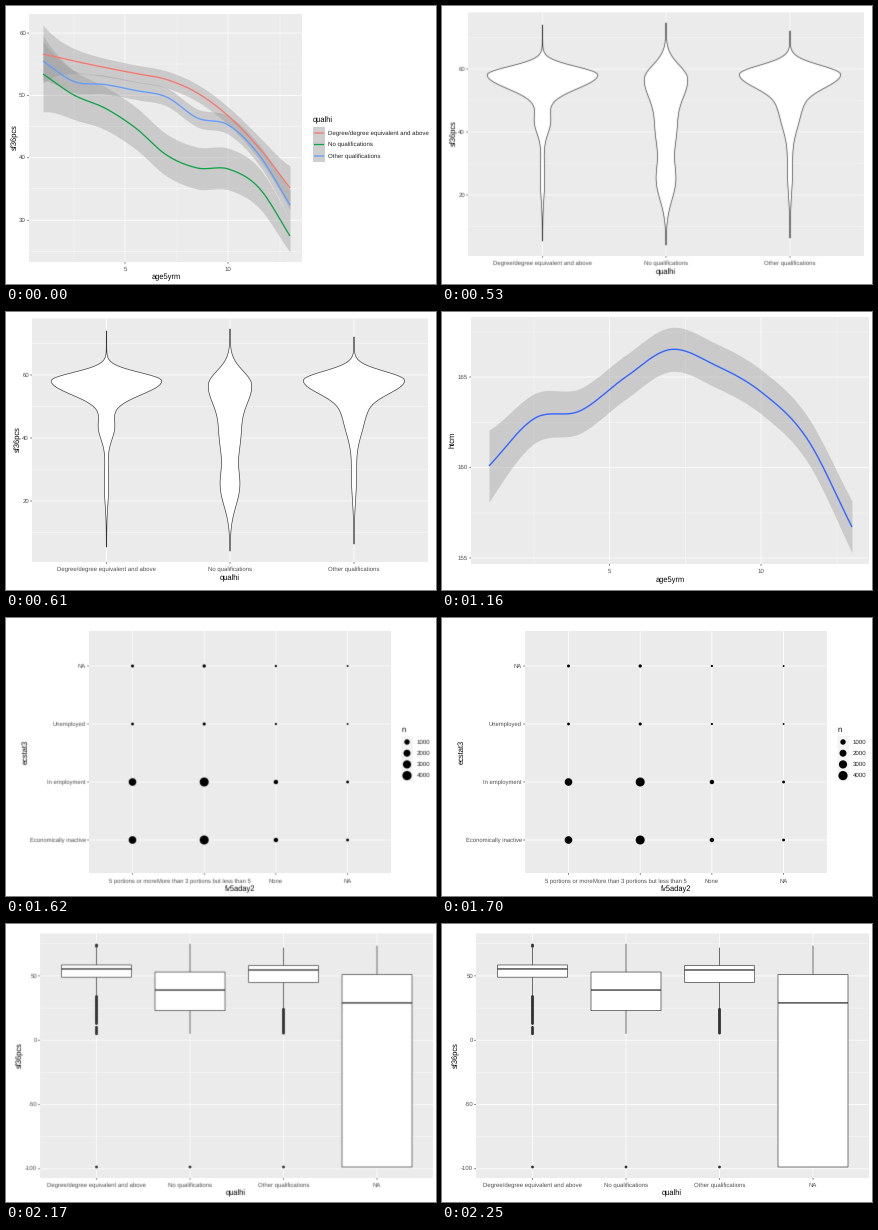
A matplotlib script for the animation above (2710 ms loop, 430 by 278 pixels).

```python
import numpy as np
import matplotlib.pyplot as plt
from matplotlib.animation import FuncAnimation
from matplotlib.patches import Circle, Rectangle

W, H, DPI = 430, 278, 64
LOOP, STEP, FADE = 2710, 10, 80
CUTS = [0, 530, 1080, 1620, 2170]
PX = 72 / DPI
SMALL, LARGE = 6.1, 7.5
GREY, DARK = "#4d4d4d", "#333333"
RED, GREEN, BLUE = "#f8766d", "#0fa345", "#619cff"
LEVELS = ["Degree/degree equivalent and above", "No qualifications",
          "Other qualifications"]

plt.rcParams.update({"font.family": "Liberation Sans", "text.hinting": "none",
                     "path.snap": False})

fig = plt.figure(figsize=(W / DPI, H / DPI), dpi=DPI, facecolor="white")
ax = fig.add_axes([0, 0, 1, 1])


def reset():
    ax.clear()
    ax.set_xlim(0, W)
    ax.set_ylim(H, 0)
    ax.axis("off")


def line(xs, ys, color=DARK, width=0.7, z=2):
    ax.plot(xs, ys, color=color, lw=width * PX, solid_capstyle="butt", zorder=z)


def label(x, y, s, size=SMALL, color=GREY, ha="center", **kw):
    ax.text(x, y, s, fontsize=size * PX, color=color, ha=ha, va="center", **kw)


def rect(x0, y0, x1, y1, color, z=0, **kw):
    ax.add_patch(Rectangle((x0, y0), x1 - x0, y1 - y0, fc=color, zorder=z, **kw))


def dot(x, y, r, color="black"):
    ax.add_patch(Circle((x, y), r, fc=color, ec="none", zorder=3))


def panel(x0, y0, x1, y1, xticks, yticks, xminor=(), yminor=(), size=SMALL,
          xtext=7):
    """Grey panel with grid, tick marks and tick labels."""
    rect(x0, y0, x1, y1, "#ebebeb", ec="none")
    for x in xminor:
        line([x, x], [y0, y1], "white", 0.4, 0.5)
    for y in yminor:
        line([x0, x1], [y, y], "white", 0.4, 0.5)
    for x, s in xticks:
        line([x, x], [y0, y1], "white", 0.8, 0.5)
        line([x, x], [y1, y1 + 1.8], DARK, 0.6)
        label(x, y1 + xtext, s, size)
    for y, s in yticks:
        line([x0, x1], [y, y], "white", 0.8, 0.5)
        line([x0 - 1.8, x0], [y, y], DARK, 0.6)
        label(x0 - 3, y, s, size, ha="right")


def titles(xname, x, xy, yname, yx, y):
    label(x, xy, xname, LARGE, "black")
    label(yx, y, yname, LARGE, "black", rotation=90)


def smooth(x0, x1, ys, n=200):
    """Cubic Hermite curve through evenly spaced heights."""
    m = np.gradient(np.array(ys, float))
    u = np.linspace(0, len(ys) - 1, n)
    k = np.minimum(u.astype(int), len(ys) - 2)
    s = u - k
    a, b = np.take(ys, k), np.take(ys, k + 1)
    v = (a + (b - a) * s * s * (3 - 2 * s)
         + s * (1 - s) * ((1 - s) * m[k] - s * m[k + 1]))
    return np.linspace(x0, x1, n), v


def ribbon(x, y, left, mid, right):
    """Confidence band that flares out towards both ends."""
    u = np.linspace(0, 1, len(x))
    half = mid + (left - mid) * (1 - u) ** 12 + (right - mid) * u ** 12
    ax.fill_between(x, y - half, y + half, color="#999999", alpha=0.4, lw=0)


def trends():
    panel(23, 8, 296, 256, [(119, "5"), (222, "10")],
          [(27 + 62.4 * i, str(60 - 10 * i)) for i in range(4)],
          68 + 103 * np.arange(3), 58 + 62.4 * np.arange(4))
    fits = [(RED, [48, 55, 61.5, 67.5, 73.5, 87, 110, 142, 182], (29, 8.5, 22)),
            (GREEN, [68, 89, 102, 122, 149, 162, 163, 182, 230], (38, 21, 16)),
            (BLUE, [55, 75.5, 78.5, 84.5, 91, 112, 119, 149, 199], (19, 9, 15))]
    label(307, 114, "qualhi", LARGE, "black", ha="left")
    rect(307, 121, 319, 156, "#cecece", ec="none")
    for i, (color, ys, band) in enumerate(fits):
        x, y = smooth(37, 284, ys)
        ribbon(x, y, *band)
        line(x, y, color, 1.3)
        key = 127 + 11.5 * i
        line([308, 318], [key, key], color, 1.3)
        label(322, key, LEVELS[i], color="#222222", ha="left")
    titles("age5yrm", 160, 271, "sf36pcs", 8.8, 131)


def violin(cx, top, bottom, bumps):
    """Outline from bumps of (centre, width, spread above, spread below)."""
    y = np.linspace(top, bottom, 300)
    half = 0.2 + sum(a * np.exp(-((y - c) / np.where(y < c, up, down)) ** 2)
                     for c, a, up, down in bumps)
    ax.fill(np.r_[cx - half, (cx + half)[::-1]], np.r_[y, y[::-1]],
            fc="white", ec=DARK, lw=0.65 * PX)


def violins():
    xs = [100.5, 224, 348]
    panel(26, 6.5, 422, 250, zip(xs, LEVELS),
          [(63 + 63 * i, str(60 - 20 * i)) for i in range(3)],
          yminor=31.5 + 63 * np.arange(4), size=6)
    violin(xs[0], 19, 235,
           [(69, 55, 12, 20), (115, 7.5, 18, 18), (175, 1.9, 45, 25)])
    violin(xs[1], 17, 239,
           [(73, 21, 20, 30), (125, 9.5, 30, 30), (175, 9, 26, 28)])
    violin(xs[2], 25, 232,
           [(68.5, 50, 13, 20), (105, 10, 20, 28), (165, 2.3, 30, 32)])
    titles("qualhi", 224, 266, "sf36pcs", 11.8, 127.5)


def height():
    panel(29, 5, 427, 252, [(167.5, "5"), (319, "10")],
          [(65 + 90.5 * i, str(165 - 5 * i)) for i in range(3)],
          92 + 151.5 * np.arange(3), 20 + 90.5 * np.arange(3))
    x, y = smooth(47, 410, [154, 106.5, 99, 65.5, 37.5, 53.5, 80, 126, 215])
    ribbon(x, y, 36, 22, 26)
    line(x, y, "#3366ff", 1.4)
    titles("age5yrm", 228, 268, "htcm", 10.8, 128)


def radius(n):
    return 0.8 + 3.8 * np.sqrt(n / 4000)


def counts():
    xs, ys = 126.5 + 71.7 * np.arange(4), 48 + 58 * np.arange(4)
    panel(83, 13, 385, 255,
          zip(xs, ["5 portions or more", "More than 3 portions but less than 5",
                   "None", "NA"]),
          zip(ys, ["NA", "Unemployed", "In employment",
                   "Economically inactive"]), size=5.9, xtext=8)
    for y, share in zip(ys, [0.05, 0.04, 1, 1]):
        for x, n in zip(xs, [2500, 3800, 550, 100]):
            dot(x, y, radius(n * share))
    label(396, 111.5, "n", LARGE, "black", ha="left")
    rect(395.5, 118, 407, 163, "#f4f4f4", ec="none")
    for i in range(4):
        n, y = 1000 * (i + 1), 124 + 11.2 * i
        dot(401, y, radius(n))
        label(410.5, y, str(n), color="#222222", ha="left")
    titles("fv5aday2", 234, 271, "ecstat3", 19.5, 134)


def score_y(v):
    return 116.2 - 1.286 * np.asarray(v)


def box(x, stats, outliers):
    top, q3, median, q1, low = score_y(stats)
    line([x, x], [top, q3])
    line([x, x], [q1, low])
    rect(x - 35, q3, x + 35, q1, "white", 3, ec=DARK, lw=0.65 * PX)
    line([x - 35, x + 35], [median, median], width=1.3, z=4)
    for y in score_y(outliers):
        dot(x, y, 1.4, DARK)


def boxes():
    xs = 90.5 + 93.5 * np.arange(4)
    panel(34, 9.5, 427, 254, zip(xs, LEVELS + ["NA"]),
          [(score_y(v), str(v)) for v in (50, 0, -50, -100)],
          yminor=score_y([75, 25, -25, -75]), size=6)
    low = -98.6
    box(xs[0], [72, 58.5, 55.4, 49, 35],
        [74, 73, *np.linspace(13, 34, 22), *np.linspace(5, 10, 5), low])
    box(xs[1], [75, 53, 39, 23, 5], [low])
    box(xs[2], [72, 58, 54.6, 45, 25], [*np.linspace(5.5, 24, 19), low])
    box(xs[3], [73.5, 51, 29, low, low], [])
    titles("qualhi", 230, 269, "sf36pcs", 13.8, 131.5)


def render(scene):
    reset()
    scene()
    fig.canvas.draw()
    return np.array(fig.canvas.buffer_rgba())[..., :3] / 255


def soften(img):
    """Slight blur that a slide shows while it settles."""
    near = sum(np.roll(img, d, axis) for d in (-1, 1) for axis in (0, 1))
    return 0.6 * img + 0.1 * near


sharp = [render(s) for s in (trends, violins, height, counts, boxes)]
soft = [soften(img) for img in sharp]
reset()
view = ax.imshow(sharp[0], extent=(0, W, H, 0), aspect="auto",
                 interpolation="nearest")


def update(i):
    t = i * STEP
    k = sum(t >= c for c in CUTS) - 1
    settling = k > 0 and t < CUTS[k] + FADE
    view.set_data(soft[k] if settling else sharp[k])
    return [view]


anim = FuncAnimation(fig, update, frames=LOOP // STEP, interval=STEP,
                     repeat=True, repeat_delay=0)
plt.show()
```
